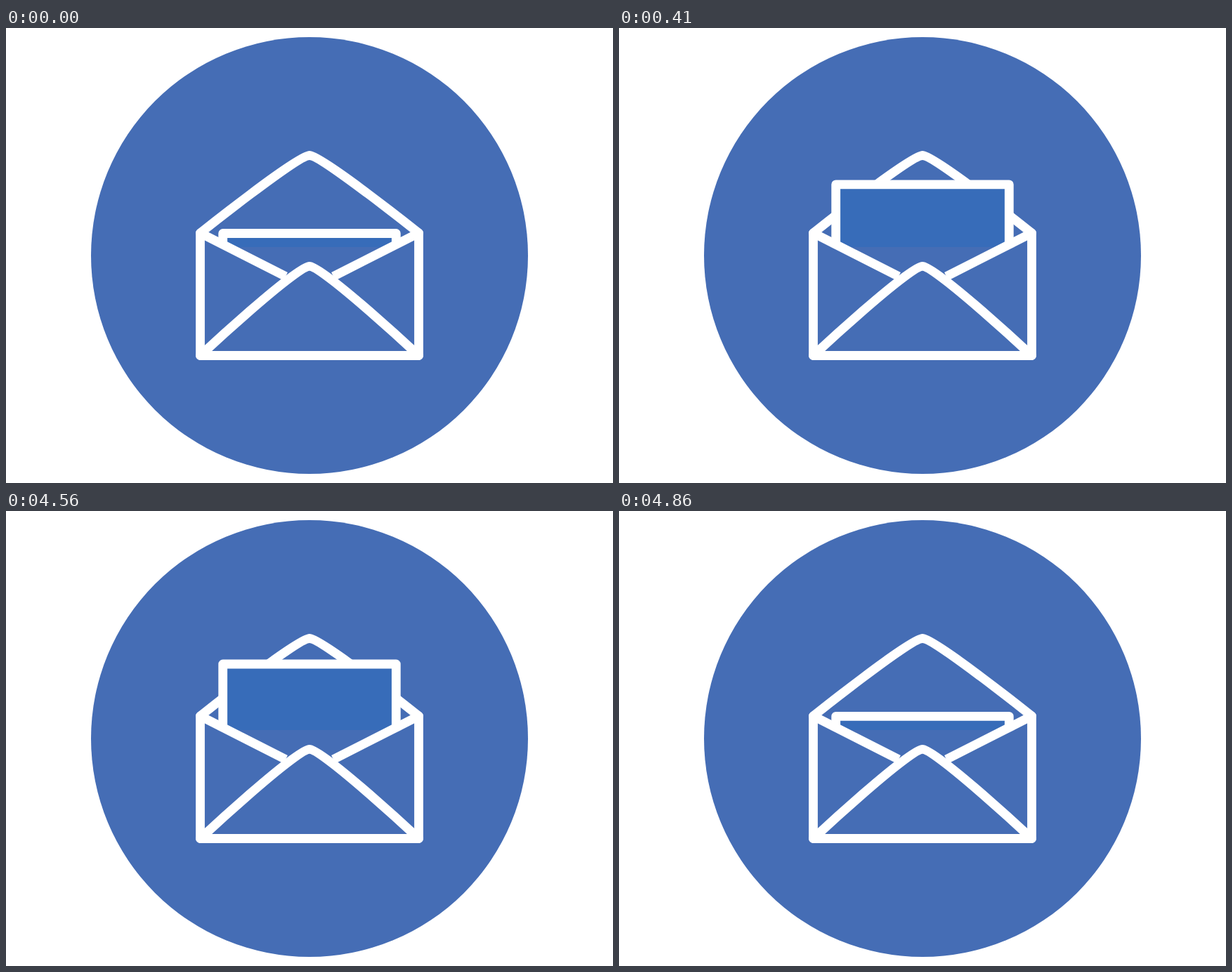
Animation of 864 by 648 pixels, one loop 4890 ms. Source, as an HTML page:

```html
<!DOCTYPE html>
<html lang="en">
<head>
<meta charset="utf-8">
<title>Letter confirmed</title>
<style>
  html, body { margin: 0; width: 100%; height: 100%; overflow: hidden; background: #fff; }
  svg { display: block; width: 100vw; height: 100vh; }
  .line { fill: none; stroke: #fff; stroke-width: 12.8; stroke-linejoin: round; }
  .round { stroke-linecap: round; }
</style>
</head>
<body>
<svg viewBox="0 0 864 648">
  <circle cx="432" cy="324" r="311" fill="#456db5"/>
  <path class="line round" d="M276.5 292C276.5 292 415 181.5 432 181.5S587.5 292 587.5 292"/>
  <path id="paper" fill="#376cb9"/>
  <path id="paperEdge" class="line"/>
  <path id="check" class="line round" pathLength="1" d="M402.7 277.3L419.5 291.5L461.3 258"/>
  <path class="line" d="M276.5 292L398 353.8M587.5 292L466 353.8"/>
  <path class="line round" d="M276.5 292V466.5H587.5V292"/>
  <path class="line round" d="M276.5 466.5C276.5 466.5 413 339.3 432 339.3S587.5 466.5 587.5 466.5"/>
</svg>
<script>
const LOOP = 4890, STEP = 30, PHASE = 20;
const LOW = 292.5, HIGH = 215;
const paper = document.getElementById('paper');
const paperEdge = document.getElementById('paperEdge');
const check = document.getElementById('check');

// cubic-bezier(.42, 0, .58, 1)
function easeInOut(x) {
  if (x <= 0) return 0;
  if (x >= 1) return 1;
  let lo = 0, hi = 1;
  for (let i = 0; i < 24; i++) {
    const s = (lo + hi) / 2, r = 1 - s;
    if (1.26 * s * r * r + 1.74 * s * s * r + s * s * s < x) lo = s;
    else hi = s;
  }
  return lo * lo * (3 - 2 * lo);
}

const progress = (t, start, end) => easeInOut((t - start) / (end - start));

function render(time) {
  // The picture advances in 30 ms steps.
  const t = Math.floor((time - PHASE) / STEP) * STEP + PHASE;

  const rise = progress(t, 200, 470) - progress(t, 4500, 4860);
  const top = LOW + (HIGH - LOW) * rise;
  paper.setAttribute('d', `M308.7 ${top}H555.3V312H308.7Z`);
  paperEdge.setAttribute('d', `M308.7 308V${top}H555.3V308`);

  const drawn = progress(t, 770, 950);
  const erased = progress(t, 4230, 4400);
  const visible = drawn - erased;
  check.setAttribute('visibility', visible > 0 ? 'visible' : 'hidden');
  check.setAttribute('stroke-dasharray', `${Math.max(visible, 0)} 2`);
  check.setAttribute('stroke-dashoffset', -erased);
}

const begin = performance.now();
function tick() {
  render((performance.now() - begin) % LOOP);
  requestAnimationFrame(tick);
}
tick();
</script>
</body>
</html>
```
